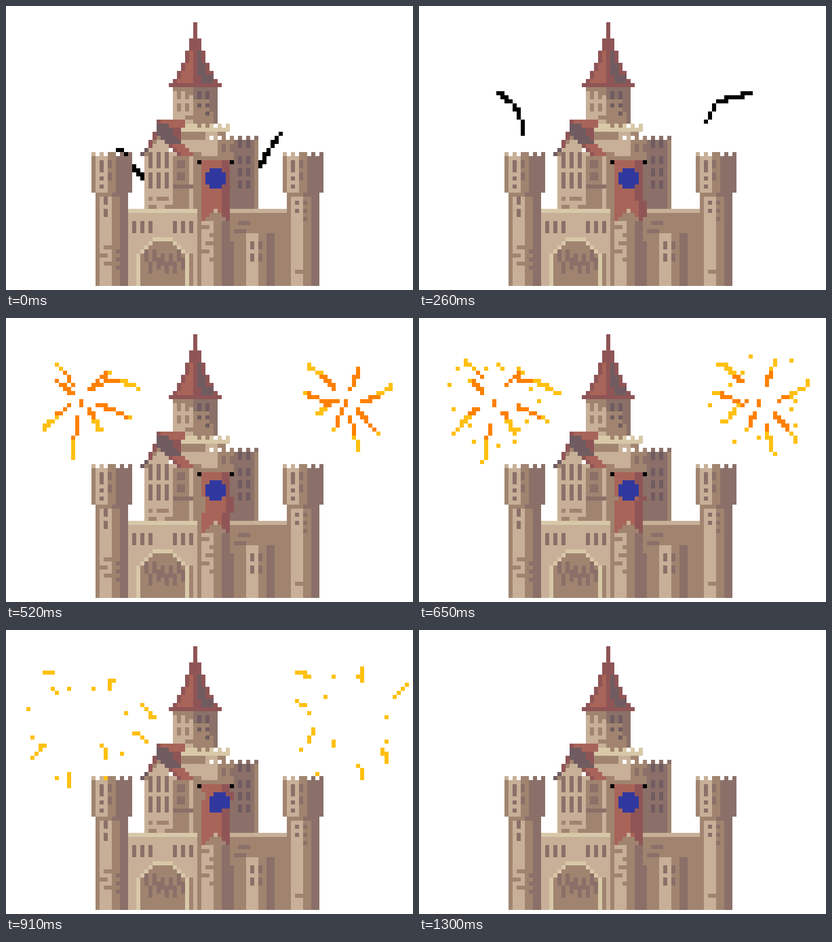
An HTML page with a canvas that plays this animation: 800x560 px, repeating every 1430 ms.

```html
<!DOCTYPE html>
<html lang="en">
<head>
<meta charset="utf-8">
<title>Castle fireworks</title>
<style>
html, body { margin: 0; width: 800px; height: 560px; overflow: hidden; background: #fff; }
canvas { display: block; }
</style>
</head>
<body>
<canvas id="stage" width="800" height="560"></canvas>
<script>
const CELL = 8, STEP = 130, STEPS = 11;
const L = '#c8b098', M = '#a08470', D = '#8a7068', P = '#705c60', H = '#d8c8a8';
const R = '#a86458', Q = '#8f5556', ORANGE = '#ff8000', YELLOW = '#ffc010', BLACK = '#000', BLUE = '#3038a0';

const stage = document.getElementById('stage').getContext('2d');
const castle = document.createElement('canvas');
castle.width = 800;
castle.height = 560;
let ctx = castle.getContext('2d');

function box(color, x, y, w = 1, h = 1) {
  ctx.fillStyle = color;
  ctx.fillRect(x * CELL, y * CELL, w * CELL, h * CELL);
}

// Vertical stripes side by side, each as [color, width].
function bands(x, y, h, stripes) {
  for (const [color, w] of stripes) {
    box(color, x, y, w, h);
    x += w;
  }
}

function windows(color, xs, ys, h) {
  for (const x of xs) for (const y of ys) box(color, x, y, 1, h);
}

function random(seed) {
  return () => (seed = seed * 16807 % 2147483647) / 2147483647;
}

function spire() {
  box(Q, 46, 4, 1, 4);
  box(Q, 45, 8, 3, 3);
  for (let y = 11; y < 19; y++) {
    const half = Math.max(2, Math.floor((y - 8) / 2));
    box(Q, 46 - half, y, 2 * half + 1);
    box(R, 47 - half, y, half - 1);
    box(P, y < 17 ? 47 : 48, y, Math.min(half - 1, y < 17 ? 2 : 3));
  }
  box(Q, 40, 19, 13);
}

function highTower() {
  bands(41, 20, 9, [[L, 5], [M, 4], [D, 2]]);
  box(M, 46, 26, 5, 3);
  // shade of the roof
  box(M, 41, 20, 5);
  box(M, 44, 21, 2);
  box(D, 46, 20, 5, 3);
  windows(M, [42, 44], [21, 24], 2);
  windows(P, [47, 49], [21], 2);
  windows(P, [47, 49], [24], 1);
  box(P, 49, 26);
  box(M, 44, 27, 3);
  // parapet
  box(M, 42, 29, 9);
  box(H, 42, 30, 12);
  box(H, 44, 29);
  for (let x = 45; x < 55; x += x < 46 ? 1 : 2) box(H, x, 29);
  box(H, 54, 29, 1, 2);
}

function keep() {
  bands(49, 33, 17, [[L, 3], [M, 4], [D, 5], [M, 1]]);
  for (let x = 49; x < 62; x += 2) box(x < 53 ? L : x < 57 ? M : D, x, 32);
  box(L, 41, 31, 13);
  box(L, 41, 32, 8, 5);
  box(M, 43, 31, 6, 2);
  box(M, 52, 31, 2);
  windows(D, [53, 55], [34], 2);
  windows(P, [57, 59], [33, 37, 40, 43], 2);
  box(D, 55, 39, 1, 11);
  box(M, 46, 36, 2);
  bands(41, 37, 13, [[M, 4], [L, 1], [M, 10]]);
  box(D, 55, 39, 1, 11);
  windows(D, [42, 43], [38, 41], 2);
  box(D, 41, 44, 5);
}

function house() {
  for (let i = 0; i < 5; i++) {
    const x = 37 - Math.ceil(i * 0.75);
    box(L, x, 32 + i, 2 + i * 1.5 | 0);
    box(M, x, 32 + i);
  }
  box(L, 34, 37, 7, 13);
  windows(D, [35, 37, 39], [36, 41], 4);
  windows(M, [35, 37, 38, 39], [47], 1);
  windows(M, [35, 36, 39, 40], [49], 1);
  // roof: a slab sliding right as it descends
  for (let y = 28; y < 37; y++) {
    const x = 37 + Math.max(0, y - 31);
    const end = y < 30 ? 44 : Math.max(43, y + 10);
    const dark = y < 29 ? 1 : y < 30 ? 3 : y < 34 ? 4 : 1;
    box(y < 30 || y > 32 ? R : Q, x, y, end - x);
    box(y > 28 && y < 34 ? P : Q, x, y, dark);
  }
  // left eave
  for (let y = 31; y < 37; y++) box(y < 35 ? Q : P, y < 35 ? 36 - (y - 31 >> 1) : 69 - y, y);
}

function gate() {
  const arch = (color, radius) => {
    for (let y = 57; y < 69; y++) {
      const rise = Math.max(0, 63 - y);
      const half = Math.sqrt(Math.max(0, radius * radius - rise * rise));
      const x = Math.round(38.5 - half);
      box(color, x, y, Math.round(38.5 + half) - x);
    }
  };
  arch(H, 6.4);
  arch(M, 5.5);
  const rnd = random(11);
  for (let x = 34; x < 44; x += 2) {
    box(D, x, 60 + Math.floor(rnd() * 2), 1, 3);
    box(D, x + 1, 62 + Math.floor(rnd() * 3), 1, 3);
  }
  box(M, 45, 61, 1, 8);
}

function wall() {
  bands(29, 50, 19, [[L, 18], [M, 1], [L, 3], [M, 2], [D, 2], [M, 14]]);
  box(H, 30, 50, 17);
  box(L, 55, 50, 14);
  windows(D, [31, 33, 35, 41, 43, 45], [53], 3);
  gate();
  // bricks on the central pillar
  for (let i = 0; i < 5; i++) box(M, 48 + i * 2 % 3, 54 + 2 * i, 2);
  // right wall and buttress
  box(D, 57, 53, 3);
  box(D, 56, 55, 3);
  box(D, 55, 58, 1, 11);
  bands(59, 56, 13, [[L, 3], [M, 2], [D, 2]]);
  windows(D, [60, 62], [58, 61], 2);
}

function sideTower(x) {
  bands(x, 37, 9, [[M, 1], [L, 3], [M, 2], [D, 4]]);
  for (const dx of [0, 2, 4, 5, 7, 9]) box(dx < 4 ? L : dx < 6 ? M : D, x + dx, 36);
  box(D, x + 2, 38, 1, 3);
  box(D, x + 4, 38, 1, 2);
  windows(D, [x + 2], [42, 44], 1);
  box(D, x + 4, 41, 1, 2);
  bands(x + 1, 46, 23, [[M, 1], [L, 3], [M, 2], [D, 2]]);
  box(M, x + 1, 46, 4);
  box(D, x + 5, 46, 4);
}

function sideTowers() {
  sideTower(21);
  windows(D, [24], [47, 50], 2);
  for (let i = 0; i < 3; i++) {
    box(M, 24 - i % 2 * 2, 59 + 2 * i, 3);
    box(D, 27, 60 + 2 * i, 3);
  }
  sideTower(68);
  windows(D, [71, 73], [48, 50], 1);
  box(D, 73, 52);
  box(M, 71, 65, 3);
}

[keep, highTower, spire, house, wall, sideTowers].forEach(draw => draw());

// A fold climbs the cloth two rows at a time, resting once at the middle.
function banner(k) {
  const top = 52 - 2 * (k < 5 ? k : k - 1);
  const bottom = k > 8 ? 0 : top + (k < 5 ? 3 : k > 5 ? 1 : 0);
  const folded = (y, extra = 0) => k > 0 && y >= top && y <= bottom + extra ? 1 : 0;
  for (let y = 38; y < 53; y++) {
    const push = folded(y);
    const x = 48 + (k > 2 ? push : 0), right = 55 + push;
    const notch = Math.max(0, y - 49);
    const dark = k === 10 && y > 44 && !notch ? 3 : Math.min(2, 4 - notch);
    box(R, x, y, right - x - dark);
    box(Q, right - dark, y, dark);
    if (notch) box(y < 51 ? L : M, 52 - notch, y, 2 * notch - 1);
  }
  if (k < 3) bands(49, 51, 2, [[L, 0], [M, 0]]);
  for (let y = 40; y < 45; y++) {
    const push = k > 5 ? folded(y, 2) : 0;
    const trim = y === 40 || y === 44 ? 1 : 0;
    box(BLUE, 49 + trim + push, y, 5 - 2 * trim);
  }
  box(BLACK, 47, 38, k === 8 ? 2 : 1);
  if (k !== 8) box(BLACK, 55, 38);
}

// Rockets climb along corner points; each step shows two segments or so.
const ROCKETS = [
  [[33, 42], [31, 39], [27, 34], [25, 31], [24, 25], [19, 21]],
  [[62, 39], [64, 35], [67, 31], [70, 28], [73, 23], [81, 21]]
];

function rocket(path, k) {
  const tail = 1.5 * k;
  for (let u = tail; u <= tail + 2; u += 0.1) {
    const i = Math.min(4, Math.floor(u)), f = u - i;
    const [ax, ay] = path[i], [bx, by] = path[i + 1];
    box(BLACK, Math.round(ax + (bx - ax) * f), Math.round(ay + (by - ay) * f));
  }
}

// Arms: tip offset from the centre and how far the middle bows upward.
const BURSTS = [
  {
    x: 18, y: 20, seed: 5,
    first: [[-8, -10, 2], [17, 0, 5], [-11, 10, 2], [-3, 17, 0], [6, 10, 1]],
    later: [[-7, -6, 0], [8, -8, 1], [15, 6, 1]]
  },
  {
    x: 83, y: 20, seed: 23,
    first: [[-11, -10, 1], [14, -6, -2], [-9, 6, 2], [4, 15, 0]],
    later: [[-12, -3, -1], [4, -10, 0], [-3, 8, 0], [10, 11, 1]]
  }
];

function arm(burst, [dx, dy, bow], age, glow) {
  const head = 0.76 + 0.08 * age, tail = 0.22 + 0.04 * age * age;
  const stride = 0.7 / Math.hypot(dx, dy);
  for (let s = tail; s <= head; s += stride) {
    const x = burst.x + dx * s, y = burst.y + dy * s - 4 * bow * s * (1 - s);
    box(s < glow ? ORANGE : YELLOW, Math.round(x), Math.round(y));
  }
}

// Loose sparks fly outward and fall.
function sparks(burst, age) {
  const rnd = random(burst.seed);
  for (let i = 0; i < 15 - 3 * age; i++) {
    const angle = i * 2.4 + burst.seed, r = 8 + 5 * rnd() + age;
    box(YELLOW, Math.round(burst.x + r * Math.cos(angle)),
      Math.round(burst.y + r * Math.sin(angle) + 2 * age));
  }
}

function fireworks(k) {
  if (k < 3) ROCKETS.forEach(path => rocket(path, k));
  if (k < 3 || k > 7) return;
  for (const burst of BURSTS) {
    const age = k - 3;
    burst.first.forEach(a => arm(burst, a, age, 0.55));
    if (k > 3) burst.later.forEach(a => arm(burst, a, age, 0.8));
    if (k > 4) sparks(burst, k - 5);
    if (k < 6) box(ORANGE, burst.x, burst.y, 1, 2);
  }
}

ctx = stage;
let shown = -1;
function tick() {
  const k = Math.floor(performance.now() / STEP) % STEPS;
  if (k !== shown) {
    shown = k;
    box('#fff', 0, 0, 100, 70);
    fireworks(k);
    ctx.drawImage(castle, 0, 0);
    banner(k);
  }
  requestAnimationFrame(tick);
}
tick();
</script>
</body>
</html>
```
